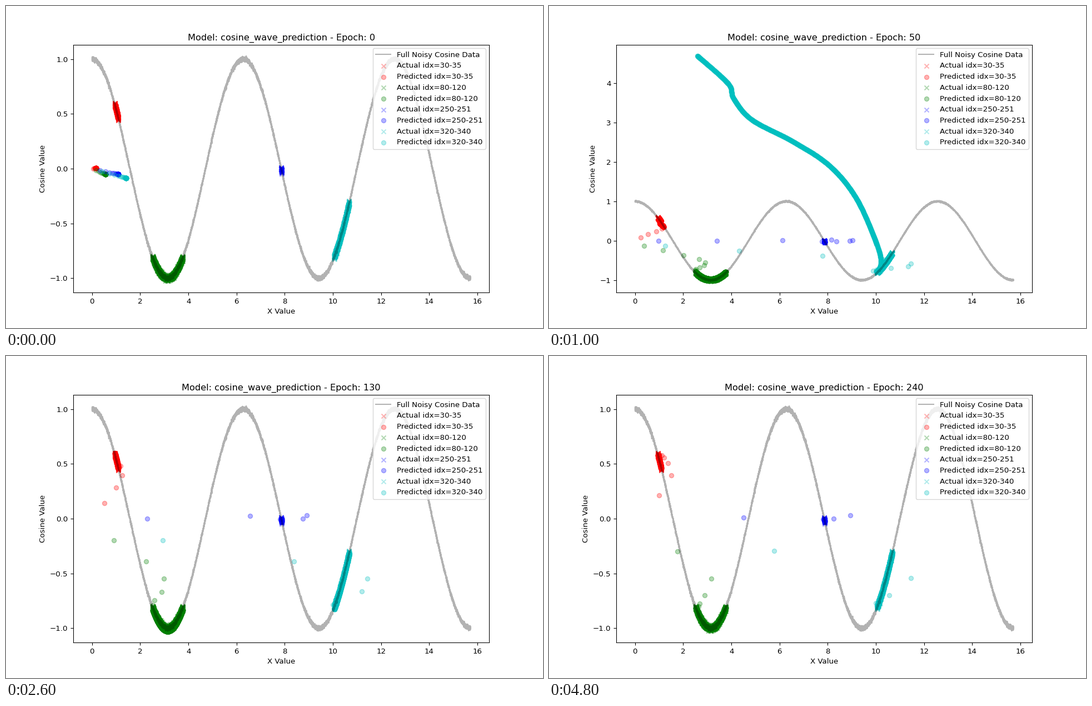
A matplotlib script for the animation above (5 s loop, 966 px wide and 580 px high).

```python
import numpy as np
import matplotlib.pyplot as plt
from matplotlib.animation import FuncAnimation

DPI = 96.6
PER_IDX = 50
STEP = np.pi / 100 / PER_IDX

# first idx, last idx, colour, untrained output, early push, epochs needed to learn
SERIES = [
    (30, 35, "r", (.17, .006), .76, 42),
    (80, 120, "g", (.55, -.05), .2, 28),
    (250, 251, "b", (1.1, -.05), 0, 5),
    (320, 340, "c", (1.42, -.085), 0, 24),
]

# Key points of the two ways in which the last series runs away.
WANDER = [(10, -.44), (10.11, -.27), (9.35, -.04), (7.5, .045), (5.54, -.03), (4.97, -.34),
          (5.89, -1.28), (6.58, -1.62), (7.57, -2.33), (7.92, -2.61), (8.5, -2.91),
          (9.24, -2.57), (10.39, -2.17), (11.22, -2.04), (11.1, -1.87), (12.1, -2.65),
          (13.2, -3.18), (13.62, -3.11), (13.87, -3.19), (14.1, -2.85), (15.2, -1.65),
          (15.22, -1.53), (15.62, -1.3)]
CLIMB = [(9.95, -.84), (10.2, -.59), (10.04, -.1), (9.19, 1.07), (8.08, 1.9), (6.58, 2.51),
         (4.85, 3.07), (4.09, 3.61), (3.86, 3.99), (2.59, 4.69)]


def bump(value, centre, width):
    return np.exp(-((value - centre) / width)**2)


def spline(points, u):
    """Catmull-Rom curve through points, sampled at arc fractions u."""
    p = np.array(points, float)
    arc = np.r_[0, np.cumsum(np.hypot(np.diff(p[:, 0]), np.diff(p[:, 1]) * 2))]
    pos = np.interp(u, arc / arc[-1], np.arange(len(p)))
    i = np.minimum(pos.astype(int), len(p) - 2)
    f = (pos - i)[:, None]
    p = np.vstack([p[0], p, p[-1]])
    a, b, c, d = p[i], p[i + 1], p[i + 2], p[i + 3]
    return (b + f * (c - a) / 2 + f**2 * (a - 2.5 * b + 2 * c - d / 2)
            + f**3 * (1.5 * (b - c) + (d - a) / 2)).T


def rise(s):
    """Damped overshoot from 0 to 1 of a network fed with its first samples."""
    return 1 - np.exp(-.9 * s**2) * np.cos(1.6 * s + .1 * s**4)


def drift(epoch, x, y, u):
    """Runaway path of the last series; it fades out as training goes on."""
    if epoch <= 30:
        late = epoch - 20
        reach = 1 + .00147 * late**2 - .0048 * late
        depth = 1 - .04 * max(late, 0)
        px, py = spline(WANDER, u**1.5)
        return 10 + (px - 10) * reach, py * depth
    share = min(1, 1.05 - ((epoch - 54) / 20)**2)
    return spline(CLIMB, u * share) if share > 0 else (x, y)


def predict(epoch, lo, hi, color, start, push, learn_time):
    n = (hi - lo) * PER_IDX
    k = np.arange(1, n + 1)
    if epoch == 0:
        settle = 1 - .7**k
        return start[0] * settle, start[1] * settle
    t = lo * np.pi / 100 + k * STEP
    speed = .155 + .0018 * epoch
    s = speed * k
    amp = 1 - np.exp(-(epoch / learn_time)**2) + .05 * bump(epoch, 100, 40)
    x, y = t, amp * np.cos(t)
    if color == "r":
        x = t * (1 + .1 * bump(epoch, 65, 35))
    elif color == "c":
        x, y = drift(epoch, x, y, k / n)
    y = y * (1 - np.exp(-(.6 * s + .3 * s**2) / amp))
    if color == "b":
        y = y + .04 * bump(s, 1, .35) - .04 * np.exp(-epoch / 30)
    kick = push * t[0] * rise(speed) * 1.1 * np.exp(-(k / 5)**3)
    return x * rise(np.minimum(s, 4)) + kick, y


rng = np.random.default_rng(4)
wave_x = np.arange(500 * PER_IDX + 1) * STEP
wave_y = np.clip(np.cos(wave_x) + rng.normal(0, .01, wave_x.size), -1.0275, 1.036)

fig, ax = plt.subplots(figsize=(966.01 / DPI, 580.01 / DPI), dpi=DPI)


def draw(frame):
    epoch = frame * 10
    ax.clear()
    ax.plot(wave_x, wave_y, color="black", alpha=.3, label="Full Noisy Cosine Data")
    for series in SERIES:
        lo, hi, color = series[:3]
        part = slice(lo * PER_IDX, hi * PER_IDX)
        ax.scatter(wave_x[part], wave_y[part], color=color, marker="x", alpha=.3,
                   label=f"Actual idx={lo}-{hi}")
        ax.scatter(*predict(epoch, *series), color=color, marker="o", alpha=.3,
                   label=f"Predicted idx={lo}-{hi}")
    ax.set_title(f"Model: cosine_wave_prediction - Epoch: {epoch}")
    ax.set_xlabel("X Value")
    ax.set_ylabel("Cosine Value")
    ax.legend(loc="upper right")


anim = FuncAnimation(fig, draw, frames=25, interval=200, init_func=lambda: None,
                     repeat=True, repeat_delay=0)
plt.show()
```
